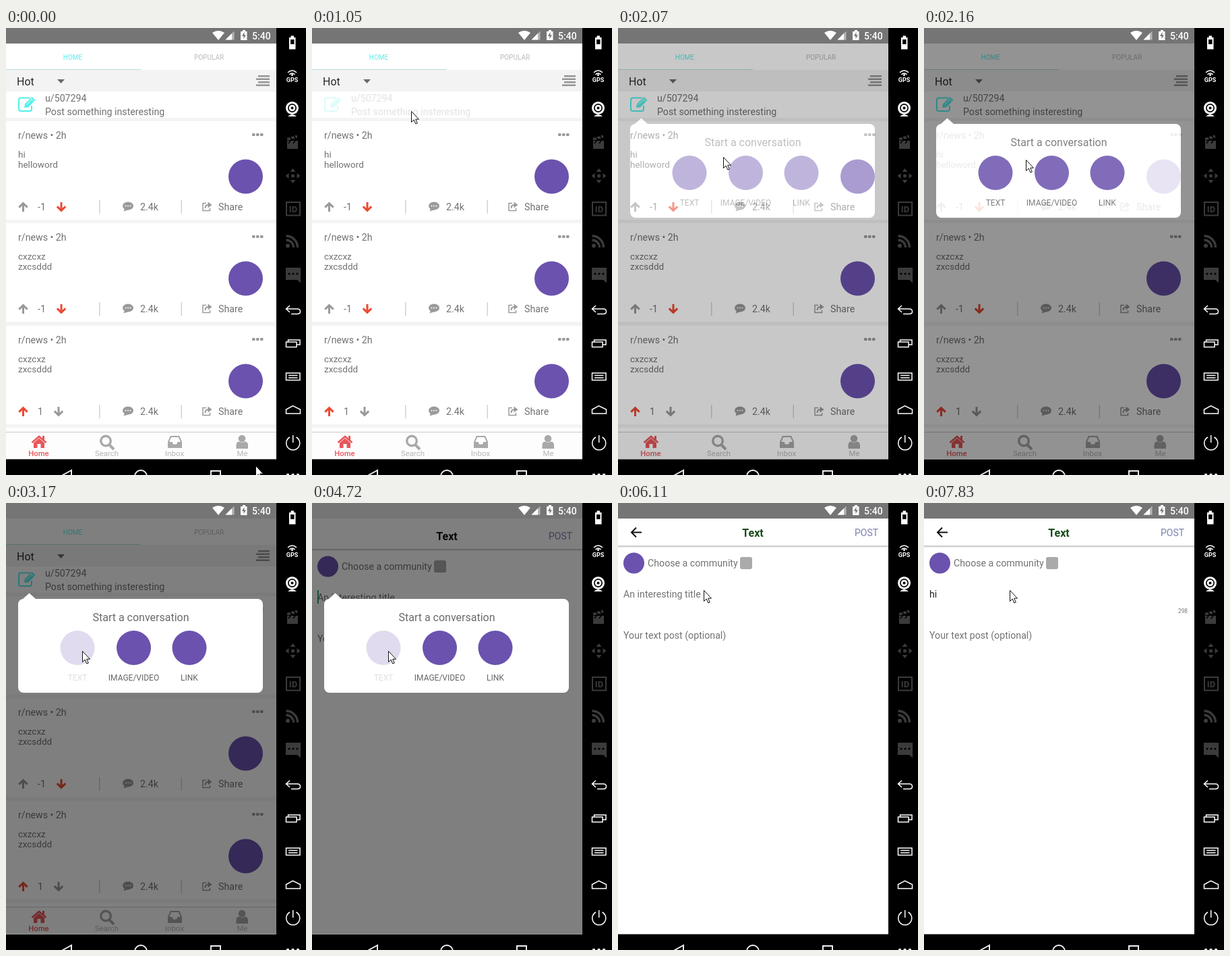
An HTML page that plays this animation: 445x662 px, repeating every 8 s.

```html
<!DOCTYPE html>
<html lang="en">
<head>
<meta charset="utf-8">
<title>Post composer</title>
<style>
html, body { margin: 0; width: 100%; height: 100%; overflow: hidden; background: #000; }
svg { display: block; width: 445px; height: 662px; }
text { font-family: Roboto, "Open Sans", sans-serif; font-size: 14.2px; fill: #727272; white-space: pre; }
.line { fill: none; stroke-linecap: butt; stroke-linejoin: miter; }
</style>
</head>
<body>
<svg id="stage" viewBox="0 0 445 662" xmlns="http://www.w3.org/2000/svg"></svg>
<script>
const LOOP = 8000;
const PURPLE = '#6b52ae', RED = '#ec4a33', GREY = '#9a9a9a', CYAN = '#55efec';

// Drawing helpers
const text = (x, y, s, extra = '') => `<text x="${x}" y="${y}" ${extra}>${s}</text>`;
const mid = (x, y, s, size, fill, extra = '') =>
  text(x, y, s, `text-anchor="middle" style="font-size:${size}px;fill:${fill}" ${extra}`);
const rect = (x, y, w, h, fill, rx = 0) =>
  `<rect x="${x}" y="${y}" width="${w}" height="${h}" fill="${fill}" rx="${rx}"/>`;
const disc = (x, y, r, fill = PURPLE) => `<circle cx="${x}" cy="${y}" r="${r}" fill="${fill}"/>`;
const shape = (d, fill) => `<path d="${d}" fill="${fill}"/>`;
const line = (d, stroke, w = 1.5) => `<path class="line" d="${d}" stroke="${stroke}" stroke-width="${w}"/>`;
const group = (id, body) => `<g id="${id}">${body}</g>`;
const at = (x, y, body) => `<g transform="translate(${x} ${y})">${body}</g>`;

const arrow = (x, y, up, fill) =>
  `<g transform="translate(${x} ${y}) scale(1 ${up ? 1 : -1})">` +
  line('M-6.2 .6L0 -5.4L6.2 .6M0 -4.5V7', fill, 3) + '</g>';

function statusBar() {
  return rect(0, 0, 401, 23, '#757575') +
    shape('M306 7Q315 1 324 7L315 18Z', '#fff') +
    shape('M325.5 17.5H338.5V4.5Z', '#b5b5b5') + shape('M325.5 17.5H335V8Z', '#fff') +
    shape('M348 5H351V3H355V5H357.5V18H348Z', '#fff') +
    shape('M353.5 6L350 12H352.5V16L356 10.5H353.5Z', '#757575') +
    text(365, 16.5, '5:40', 'style="font-weight:500;fill:#fff;font-size:14px"');
}

function card(y, lines, score) {
  const liked = score > 0, shift = liked ? -4 : 0;
  return at(0, y,
    rect(0, 138, 401, 146, '#fff') +
    text(18, 164, 'r/news • 2h') +
    [365, 371, 377].map(x => rect(x, 156, 4.5, 4, GREY, 1.2)).join('') +
    lines.map((s, i) => text(18, 192 + i * 15, s, 'style="font-size:13.5px"')).join('') +
    disc(355.5, 220, 25.5) +
    arrow(25.5, 265, true, liked ? RED : GREY) +
    text(47, 270, score) +
    arrow(82 + shift, 265, false, liked ? GREY : RED) +
    rect(138, 255, 1.5, 20, '#d2d2d2') + rect(259.5, 255, 1.5, 20, '#d2d2d2') +
    `<ellipse cx="181" cy="263.5" rx="8" ry="6" fill="${GREY}"/>` +
    shape('M176 267L174.5 271.5L182 269Z', GREY) +
    [177.5, 181, 184.5].map(x => disc(x, 263.5, 1, '#fff')).join('') +
    text(199, 270, '2.4k') +
    line('M297 259.5H292V270.5H302.5V267', GREY) +
    line('M295.5 267Q295.5 262 300 262', GREY, 2) + shape('M299.5 257.5L305.5 262L299.5 266.5Z', GREY) +
    text(315, 270, 'Share'));
}

function tabBar() {
  const c = '#a9a9a9', label = '#b5b5b5';
  return rect(0, 598, 401, 41, '#fdfdfd') + rect(0, 598, 401, 1, '#c9c9c9') +
    line('M38.5 614L49 605L59.5 614', '#e8575a', 2.6) + rect(54, 604, 3, 6, '#e8575a') +
    shape('M41 614.5L49 607.5L57 614.5V622H51.5V616H46.5V622H41Z', '#e8575a') +
    `<circle cx="148" cy="611.5" r="7.3" fill="none" stroke="${c}" stroke-width="3.4"/>` +
    line('M153 617L160 624', c, 4) +
    line('M241 621V613L244.5 605H256.5L260 613V621Z', c, 2) +
    shape('M241 613H246.5L248 616.5H253L254.5 613H260V621.5H241Z', c) +
    disc(350, 608, 5.3, c) + shape('M341.5 623V618Q341.5 612.5 346 612.5Q350 615 354 612.5Q359 612.5 359 618V623Z', c) +
    mid(48.5, 634, 'Home', 11.3, '#e8575a', 'font-weight="500"') +
    mid(149.5, 634, 'Search', 11.4, label) + mid(250, 634, 'Inbox', 11.6, label) + mid(350.5, 634, 'Me', 11.4, label);
}

function homePage() {
  const rows = [[374, 70], [371, 74.5], [374, 79], [371, 83.5]];
  const prompt =
    line('M36 103.5H22Q19 103.5 19 106.5V120Q19 123 22 123H35Q38 123 38 120V115', CYAN, 2) +
    shape('M27 118L28 112.5L38.5 102L43.5 107L33 117.5Z', CYAN) + line('M30.5 113.5L38 106M36.5 104L41.5 109', '#fff', 1) +
    text(58, 109, 'u/507294') + text(58, 129, 'Post something insteresting');
  return rect(0, 23, 401, 616, '#f4f4f4') + rect(0, 23, 401, 39, '#fff') +
    mid(99, 47, 'HOME', 10, CYAN) + mid(301, 47, 'POPULAR', 10, '#b9b9b9') +
    rect(0, 61, 200, 1, '#b9dfdf') + rect(0, 62, 401, 32, '#f3f3f3') +
    text(16, 85, 'Hot', 'style="font-size:16px;fill:#2a2a2a"') + shape('M76 76H87L81.5 82Z', '#6a6a6a') +
    rows.map(([x, y]) => rect(x, y, 391 - x, 2.5, '#959595')).join('') +
    rect(0, 94, 401, 39, '#fff') + group('prompt', prompt) +
    card(0, ['hi', 'helloword'], -1) +
    card(151, ['cxzcxz', 'zxcsddd'], -1) +
    card(303, ['cxzcxz', 'zxcsddd'], 1) +
    rect(0, 592, 401, 6, '#fff') + tabBar();
}

function composer() {
  const counter = s => text(391, 163, s, 'text-anchor="end" style="font-size:8.3px"');
  const typed = s => text(8, 139.5, s, 'style="fill:#222"');
  return rect(0, 23, 401, 616, '#fff') +
    ['#c8c8c8', '#d6d6d6', '#ececec'].map((c, i) => rect(0, 63 + i, 401, 1, c)).join('') +
    group('back', line('M35 43.5H20M27 36.5L20 43.5L27 50.5', '#111', 2)) +
    mid(200, 50, 'Text', 16, '#111', 'id="heading" font-weight="700"') +
    text(351, 49, 'POST', 'style="font-size:14px;fill:#7a80b0"') +
    disc(23.5, 89, 15.5) + text(44, 94, 'Choose a community') + rect(181, 80, 18, 18, '#aaa', 3) +
    group('hint', text(8, 139.5, 'An interesting title')) +
    group('typed1', typed('h') + counter('299')) +
    group('typed2', typed('hi') + counter('298')) +
    group('caret', rect(8, 124, 1.8, 20, '#12a06a')) +
    text(8, 201, 'Your text post (optional)');
}

function dialog() {
  const option = (x, s) => disc(x, 214.5, 25.5) + mid(x, 263, s, 12, '#666');
  return rect(0, 23, 401, 616, 'rgba(0,0,0,.5)') +
    rect(18, 142, 363, 139, '#fff', 8) + shape('M24.5 142.5L34.5 133.5L44.5 142.5Z', '#fff') +
    mid(200, 174.5, 'Start a conversation', 16, '#6a6a6a') +
    group('choice', option(106, 'TEXT')) + option(189.5, 'IMAGE/VIDEO') + option(272, 'LINK');
}

function navBar() {
  return rect(0, 638, 401, 1, '#9a9a9a') + rect(0, 639, 401, 23, '#000') +
    line('M97 655L79 665L97 675Z', '#eee', 2) +
    '<circle cx="200" cy="664" r="9" fill="none" stroke="#eee" stroke-width="2"/>' +
    line('M304 656H318V670H304Z', '#eee', 2);
}

function sidebar() {
  const on = '#fff', off = '#3b3b3b';
  const spike = shape('M0 -11L4 -6H-4Z', off);
  return rect(401, 0, 44, 662, '#000') +
    shape('M420 14H422.5V11.5H427V14H429.5V31.5H420Z', on) + rect(422, 17, 5.5, 7, '#000') +
    line('M418 66Q424.5 60 431 66M420.5 69Q424.5 65 428.5 69', on, 1.6) + disc(424.5, 69.5, 1.5, on) +
    mid(424.5, 79.5, 'GPS', 9, on, 'font-weight="700"') +
    disc(424.5, 118.5, 9.5, on) + disc(424.5, 118.5, 6.5, '#000') + disc(424.5, 118.5, 4.8, on) +
    disc(424.5, 118.5, 2, '#000') + shape('M418 131Q424.5 125 431 131Z', on) +
    rect(417, 167, 16, 12, off) + shape('M416.5 163L431.5 158.5L432.5 162.5L417.5 166.5Z', off) +
    line('M421 161L424 165M427 159.5L430 163.5M422 167L419 171M429 167L426 171', '#000', 1.5) +
    at(425.5, 219, [0, 90, 180, 270].map(a => `<g transform="rotate(${a})">${spike}</g>`).join('') + disc(0, 0, 2.5, off)) +
    line('M416 258H436V277.5H416Z', off, 2) + mid(426, 272.5, 'ID', 13, off, 'font-weight="700"') +
    disc(418, 322.5, 3, off) + line('M415.5 314A11 11 0 0 1 426.5 325M415.5 308A17 17 0 0 1 432.5 325', off, 3.3) +
    shape('M415 355H437V377.5L432 373H415Z', off) + [420, 426, 432].map(x => disc(x, 364, 1.6, '#000')).join('') +
    line('M421 411L415.5 416L421 421M416 416H432Q436.5 416 436.5 420Q436.5 423.5 432 423.5H423', on) +
    line('M415.5 465H431V472.5H415.5ZM418.5 465V462H436V469H431', on) +
    line('M415.5 511H436V521.5H415.5ZM419 514.5H432.5M419 518H432.5', on) +
    line('M415.5 571V565L425.5 559.5L436.5 565V571Z', on) +
    line('M421 606A10 10 0 1 0 430.5 606M425.7 603V614', on) +
    [418, 425.5, 433].map(x => disc(x, 662, 2.2, on)).join('');
}

const pointer = '<path d="M.5 .5V16.5L4.2 13L6.8 19L9.3 18L6.7 12.2H11.5Z" fill="#fff" stroke="#111"/>';

document.getElementById('stage').innerHTML =
  homePage() + group('composer', composer()) + group('dialog', dialog()) +
  statusBar() + navBar() + sidebar() + group('pointer', pointer);

// Each row is [time, value]; a value holds until the next row.
function hold(id, prop, rows, css = v => v) {
  const last = rows[rows.length - 1];
  const frames = [...rows, [LOOP, last[1]]].map(([t, v]) =>
    ({ [prop]: css(v), offset: t / LOOP, easing: 'step-end' }));
  document.getElementById(id).animate(frames, { duration: LOOP, iterations: Infinity });
}
const shift = ([x, y]) => `translate(${x}px, ${y}px)`;

// Pointer moves: first step, last step, number of steps, destination
function glide(start, moves) {
  const rows = [[0, start]];
  let from = start;
  for (const [a, b, n, to] of moves) {
    for (let k = 1; k <= n; k++) {
      const t = n > 1 ? a + (b - a) * (k - 1) / (n - 1) : a;
      rows.push([t, from.map((v, i) => Math.round(v + (to[i] - v) * k / n))]);
    }
    from = to;
  }
  return rows;
}

hold('pointer', 'transform', glide([370, 648], [
  [70, 430, 6, [157, 153]],
  [580, 730, 3, [147, 123]],
  [1280, 1860, 9, [156, 191]],
  [2160, 2710, 8, [113, 219]],
  [5190, 5810, 9, [130, 130]],
  [6110, 6110, 1, [127, 129]]
]), shift);

hold('prompt', 'opacity', [[0, 1], [1050, .2], [1930, .5], [2000, .8], [2070, 1]]);
hold('dialog', 'opacity', [[0, 0], [2000, .03], [2070, .43], [2160, .85], [2230, 1], [4870, .7], [4955, .3], [5040, 0]]);
hold('choice', 'opacity', [[0, 1], [3170, .2]]);
hold('composer', 'opacity', [[0, 0], [4640, .6], [4720, 1]]);
hold('composer', 'transform', [[0, [0, 40]], [4640, [0, 20]], [4720, [0, 5]], [4870, [0, 0]]], shift);
hold('back', 'opacity', [[0, 0], [4870, 1]]);
hold('heading', 'fill', [[0, '#111'], [5040, '#174a1a']]);
hold('hint', 'opacity', [[0, 1], [7290, 0]]);
hold('typed1', 'opacity', [[0, 0], [7290, 1], [7370, 0]]);
hold('typed2', 'opacity', [[0, 0], [7370, 1]]);
hold('caret', 'opacity', [[0, 1], [5040, 0], [5560, 1], [6110, 0], [6660, 1], [7210, 0], [7290, 1], [7830, 0]]);
hold('caret', 'transform', [[0, [0, 0]], [7290, [7.5, 0]], [7370, [11, 0]]], shift);
</script>
</body>
</html>
```
